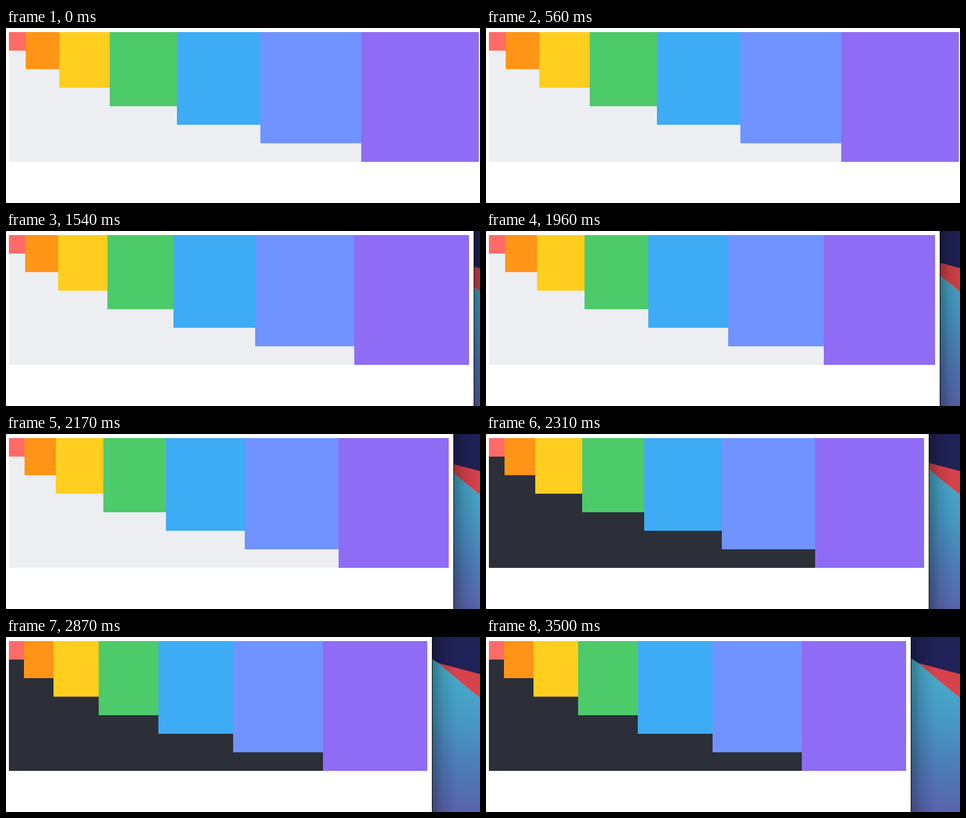
These frames come from a looping animation (818 by 302 pixels, 3.57 s). An HTML page:

```html
<!DOCTYPE html>
<html lang="en">
<head>
<meta charset="utf-8">
<title>Resizing columns</title>
<style>
  html, body { margin: 0; width: 100%; height: 100%; overflow: hidden; background: #fff; }
  svg { display: block; width: 818px; height: 302px; }
</style>
</head>
<body>
<svg viewBox="0 0 818 302">
  <defs>
    <linearGradient id="sea" gradientUnits="userSpaceOnUse" x1="790" y1="60" x2="755" y2="302">
      <stop offset="0" stop-color="#46acca"/>
      <stop offset=".35" stop-color="#4798c4"/>
      <stop offset=".7" stop-color="#4e78b6"/>
      <stop offset="1" stop-color="#5a63ab"/>
    </linearGradient>
    <linearGradient id="shade">
      <stop offset="0" stop-color="#000" stop-opacity=".3"/>
      <stop offset=".4" stop-color="#000" stop-opacity=".12"/>
      <stop offset="1" stop-color="#000" stop-opacity="0"/>
    </linearGradient>
  </defs>
  <g id="wallpaper">
    <rect x="700" width="118" height="302" fill="#1f2257"/>
    <path d="M746 45L818 64V106Z" fill="#d8424b"/>
    <path d="M700 13L734 37L746 45L784 77.5L818 105V302H700Z" fill="url(#sea)"/>
    <path d="M746 45L784 77.5L818 105" fill="none" stroke="#d99aa5" stroke-opacity=".6"/>
  </g>
  <rect id="shadow" width="42" height="302" fill="url(#shade)"/>
  <rect id="edge" width="1" height="302" fill="#050508"/>
  <rect id="page" height="302" fill="#fff"/>
  <rect id="box" x="5" y="7" height="224"/>
  <g id="columns"></g>
  <path d="M0 0h1v1h-1zM0 301h1v1h-1z" fill="#777"/>
  <path id="corners" d="M817 0h1v1h-1zM817 301h1v1h-1z" fill="#777"/>
</svg>
<script>
const LOOP = 3570, STEP = 70, LEFT = 5, TOP = 7, ROW = 32, BREAKPOINT = 757;
const COLORS = ['#ff6b66', '#ff9417', '#ffce1f', '#4dca6a', '#3eabf5', '#7093ff', '#8e6cf5'];
// [time, right side of the box]
const DRAG = [[1330, 816], [1540, 799], [1960, 775], [2310, 756], [2590, 731], [3010, 725]];

const $ = id => document.getElementById(id);
const set = (el, attrs) => {
  for (const key in attrs) el.setAttribute(key, attrs[key]);
  return el;
};

const columns = COLORS.map((fill, i) => $('columns').appendChild(set(
  document.createElementNS('http://www.w3.org/2000/svg', 'rect'),
  { y: TOP, height: ROW * (i + 1), fill })));

function rightSide(t) {
  if (t <= DRAG[0][0]) return DRAG[0][1];
  for (let i = 1; i < DRAG.length; i++) {
    const [t0, x0] = DRAG[i - 1], [t1, x1] = DRAG[i];
    if (t <= t1) return x0 + (x1 - x0) * (t - t0) / (t1 - t0);
  }
  return DRAG[DRAG.length - 1][1];
}

function draw(t) {
  const right = Math.round(rightSide(t));
  const edge = right + 8;
  const unit = (right - LEFT) / 28;
  const columnStart = i => Math.round(LEFT + unit * i * (i + 1) / 2);

  columns.forEach((rect, i) => {
    const x = columnStart(i);
    set(rect, { x, width: columnStart(i + 1) - x });
  });
  set($('box'), { width: right - LEFT, fill: right <= BREAKPOINT ? '#2c2f38' : '#eceef2' });
  set($('page'), { width: edge });
  set($('edge'), { x: edge });
  set($('shadow'), { x: edge + 1 });
  set($('corners'), { visibility: edge > 818 ? 'visible' : 'hidden' });
}

function tick() {
  const t = performance.now() % LOOP;
  draw(Math.floor(t / STEP) * STEP);
  requestAnimationFrame(tick);
}
tick();
</script>
</body>
</html>
```
